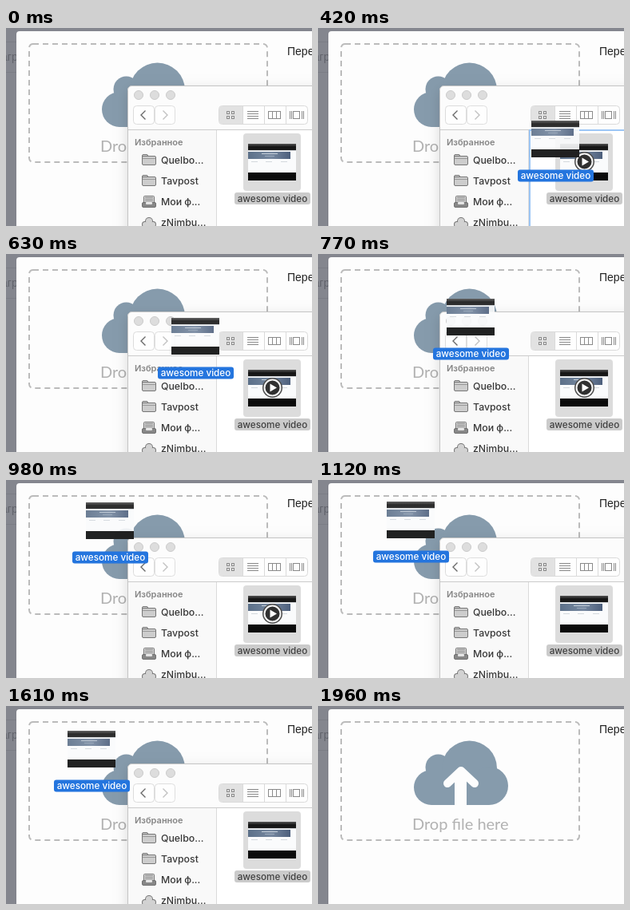
Write an HTML page with a canvas that moves like this. It is 383 by 248 pixels and loops after 2660 ms.

```html
<!DOCTYPE html>
<html lang="ru">
<head>
<meta charset="utf-8">
<title>Drag and drop upload</title>
<style>
html, body { margin: 0; width: 100%; height: 100%; overflow: hidden; background: #fdfdfd; }
canvas { display: block; width: 383px; height: 248px; }
</style>
</head>
<body>
<canvas id="stage"></canvas>
<script>
const W = 383, H = 248, LOOP = 2660, STEP = 70;
const UI = 'Inter, "Noto Sans", sans-serif';
const canvas = document.getElementById('stage');
const ctx = canvas.getContext('2d');
const dpr = window.devicePixelRatio || 1;
canvas.width = W * dpr;
canvas.height = H * dpr;

// time, label left, label centre
const PATH = [
  [420, 250, 185], [630, 190, 149], [910, 98, 100], [980, 83, 97],
  [1050, 74, 96], [1190, 64, 96], [1330, 60, 97],
  [1470, 60, 99], [1540, 60, 99], [1610, 60, 100]
];

function rect(x, y, w, h, fill) {
  ctx.fillStyle = fill;
  ctx.fillRect(x, y, w, h);
}

function round(x, y, w, h, r, fill, stroke) {
  ctx.beginPath();
  ctx.roundRect(x, y, w, h, r);
  if (fill) { ctx.fillStyle = fill; ctx.fill(); }
  if (stroke) { ctx.strokeStyle = stroke; ctx.lineWidth = 1; ctx.stroke(); }
}

function disc(x, y, r, fill, stroke, width = 1) {
  ctx.beginPath();
  ctx.arc(x, y, r, 0, Math.PI * 2);
  if (fill) { ctx.fillStyle = fill; ctx.fill(); }
  if (stroke) { ctx.strokeStyle = stroke; ctx.lineWidth = width; ctx.stroke(); }
}

function line(points, color, width) {
  ctx.beginPath();
  points.forEach(([x, y], i) => i ? ctx.lineTo(x, y) : ctx.moveTo(x, y));
  ctx.strokeStyle = color;
  ctx.lineWidth = width;
  ctx.stroke();
}

function text(str, x, y, font, color, align = 'left') {
  ctx.font = font;
  ctx.fillStyle = color;
  ctx.textAlign = align;
  ctx.fillText(str, x, y);
}

function drawPage() {
  rect(0, 0, W, H, '#84868e');
  rect(0, 17, 13, 1, '#7b7d85');
  rect(0, 55, 13, 1, '#7b7d85');
  text('агр', -6, 41, '14px "Liberation Sans", Arial, sans-serif', '#62646c');
  round(13, 4, W, H, [4, 0, 0, 0], '#fdfdfd');
  text('Пере', 352, 34, '14px "Liberation Sans", Arial, sans-serif', '#222');

  ctx.save();
  ctx.setLineDash([7, 5]);
  ctx.beginPath();
  ctx.roundRect(29, 20, 298, 148, 5);
  ctx.strokeStyle = '#bbb';
  ctx.lineWidth = 2;
  ctx.stroke();
  ctx.restore();

  const blue = '#869bac';
  disc(142, 102, 22, blue);
  disc(150.5, 76.5, 16, blue);
  disc(189.5, 78, 34.5, blue);
  disc(214, 100, 24, blue);
  rect(142, 82, 72, 42, blue);
  ctx.save();
  ctx.lineCap = ctx.lineJoin = 'round';
  line([[162, 97], [179, 81], [196, 97]], '#fdfdfd', 10);
  ctx.restore();
  rect(171, 83, 15, 41, '#fdfdfd');
  text('Drop file here', 118, 155, '20px Lato, sans-serif', '#b2b2b2');
}

function drawFolder(x, y) {
  const fill = '#cdcdcd', edge = '#777';
  round(x + .5, y + .5, 7, 6, 1.5, fill, edge);
  round(x + .5, y + 2.5, 17, 11, 1.5, fill, edge);
  rect(x + 1, y + 5, 16, 1, '#999');
}

function drawTray(x, y) {
  round(x + 2.5, y + .5, 13, 10, 1, '#d6d6d6', '#777');
  for (let i = 0; i < 3; i++) rect(x + 4, y + 2 + i * 2, 10, 1, '#8c8c8c');
  round(x + .5, y + 8.5, 17, 6, 1.5, '#888', '#707070');
  round(x + 5, y + 8, 8, 3, 1, '#e4e4e4');
}

function drawSidebarCloud(x, y) {
  const shape = (grow, color) => {
    disc(x + 4, y + 9, 4 + grow, color);
    disc(x + 9, y + 5, 5 + grow, color);
    disc(x + 14, y + 9, 4 + grow, color);
    rect(x + 4, y + 7 - grow, 10, 6 + 2 * grow, color);
  };
  shape(0, '#777');
  shape(-1, '#d2d2d2');
}

function drawViewIcons() {
  const ink = '#8a8a8a';
  ctx.save();
  ctx.strokeStyle = ink;
  ctx.lineWidth = 1;
  for (const x of [276.5, 282.5]) for (const y of [104.5, 110.5]) ctx.strokeRect(x, y, 3, 3);
  for (let i = 0; i < 4; i++) rect(302, 104 + i * 3, 14, 1, ink);
  ctx.strokeRect(328.5, 104.5, 15, 9);
  rect(333, 104, 1, 10, ink);
  rect(338, 104, 1, 10, ink);
  ctx.strokeRect(359.5, 104.5, 8, 9);
  for (const x of [355, 357, 370, 372]) rect(x, 104, 1, 10, ink);
  ctx.restore();
}

function drawWindow() {
  ctx.save();
  ctx.shadowColor = 'rgba(0,0,0,.14)';
  ctx.shadowBlur = 16 * dpr;
  ctx.shadowOffsetY = 4 * dpr;
  round(152, 73, 300, 240, 5, '#fcfcfc');
  ctx.restore();
  round(152.5, 72.5, 300, 240, 5, '#fcfcfc', '#c4c4c4');

  for (const x of [166, 186, 206]) disc(x, 84, 5.5, '#dddddd', '#cbcbcb');
  round(159.5, 97.5, 26, 23, 4, '#fefefe', '#dcdcdc');
  round(186.5, 97.5, 25, 23, 4, '#fefefe', '#dfdfdf');
  line([[174.5, 103.5], [169, 109], [174.5, 114.5]], '#6a6a6a', 1.4);
  line([[196.5, 103.5], [202, 109], [196.5, 114.5]], '#c2c2c2', 1.4);

  round(266.5, 97.5, 111, 23, 4, '#fefefe', '#dadada');
  round(267, 98, 29, 22, [3, 0, 0, 3], '#e2e2e2');
  for (const x of [296, 323, 350]) rect(x, 98, 1, 22, '#dadada');
  drawViewIcons();

  rect(153, 127, 110, H, '#f9f9f9');
  rect(263, 127, 1, H, '#dadada');
  rect(264, 127, 119, H, '#fff');
  rect(153, 127, W, 1, '#cbcbcb');

  text('Избранное', 161, 147, '600 11px ' + UI, '#858585');
  drawFolder(170, 158);
  drawFolder(170, 184);
  drawTray(170, 210);
  drawSidebarCloud(170, 237);
  ['Quelbo...', 'Tavpost', 'Мои ф...', 'zNimbu...'].forEach((name, i) =>
    text(name, 194, 170 + i * 26, '500 12.3px ' + UI, '#383838'));
}

function drawThumb(x, y) {
  rect(x, y, 60, 46, '#fafbfc');
  const bar = ctx.createLinearGradient(0, y, 0, y + 8);
  bar.addColorStop(0, '#555');
  bar.addColorStop(.5, '#141414');
  bar.addColorStop(1, '#1c1c1c');
  rect(x, y, 60, 8, bar);
  rect(x, y + 8, 60, 1, '#cfd2d6');
  const hero = ctx.createLinearGradient(x, 0, x + 53, 0);
  hero.addColorStop(0, '#5c7089');
  hero.addColorStop(.55, '#7688a0');
  hero.addColorStop(1, '#4d5f7c');
  rect(x, y + 10, 53, 9, hero);
  rect(x + 17, y + 12, 20, 1, '#c4ced9');
  rect(x + 21, y + 15, 12, 1, '#9cabbc');
  for (const dx of [4, 22, 41]) rect(x + dx, y + 22, 8, 1, '#d3d8dd');
  rect(x, y + 36, 60, 10, '#0b0b0b');
}

function drawLabel(x, mid, fill, color) {
  round(x, mid - 7.5, 95, 15, 3, fill);
  text('awesome video', x + 47.5, mid + 4, '500 11.7px ' + UI, color, 'center');
}

function drawFile(hover) {
  round(297, 132, 72, 72, 4, '#dcdcdc');
  drawThumb(303, 145);
  drawLabel(286, 213.5, '#cbcbcb', '#404040');
  if (!hover) return;
  disc(333.5, 167.5, 12.5, '#4a4a4a');
  disc(333.5, 167.5, 10, '#303030', '#f4f4f4', 2);
  ctx.beginPath();
  ctx.moveTo(330.5, 162.5);
  ctx.lineTo(339, 167.5);
  ctx.lineTo(330.5, 172.5);
  ctx.fillStyle = '#fff';
  ctx.fill();
}

function dragAt(t) {
  const last = PATH[PATH.length - 1];
  if (t >= last[0]) return [last[1], last[2]];
  const i = PATH.findIndex(p => p[0] > t);
  const [t0, x0, y0] = PATH[i - 1], [t1, x1, y1] = PATH[i];
  const k = (t - t0) / (t1 - t0);
  return [Math.round(x0 + (x1 - x0) * k), Math.round(y0 + (y1 - y0) * k)];
}

function draw(now) {
  const t = Math.floor((now % LOOP) / STEP) * STEP;
  ctx.setTransform(dpr, 0, 0, dpr, 0, 0);
  drawPage();
  if (t < 1960) {
    drawWindow();
    if (t >= 420 && t < 560) {
      ctx.strokeStyle = '#9cc6f5';
      ctx.lineWidth = 2;
      ctx.strokeRect(265, 128, 130, 140);
    }
    drawFile(t >= 70 && t < 1120);
    if (t >= 420) {
      const [x, mid] = dragAt(t);
      ctx.globalAlpha = .9;
      drawThumb(x + 17, mid - 69);
      ctx.globalAlpha = 1;
      drawLabel(x, mid, '#2475de', '#fff');
    }
  }
}

let start = null;
function tick(now) {
  if (start === null) start = now;
  draw(Math.max(0, now - start));
  requestAnimationFrame(tick);
}
draw(0);
requestAnimationFrame(tick);
</script>
</body>
</html>
```
